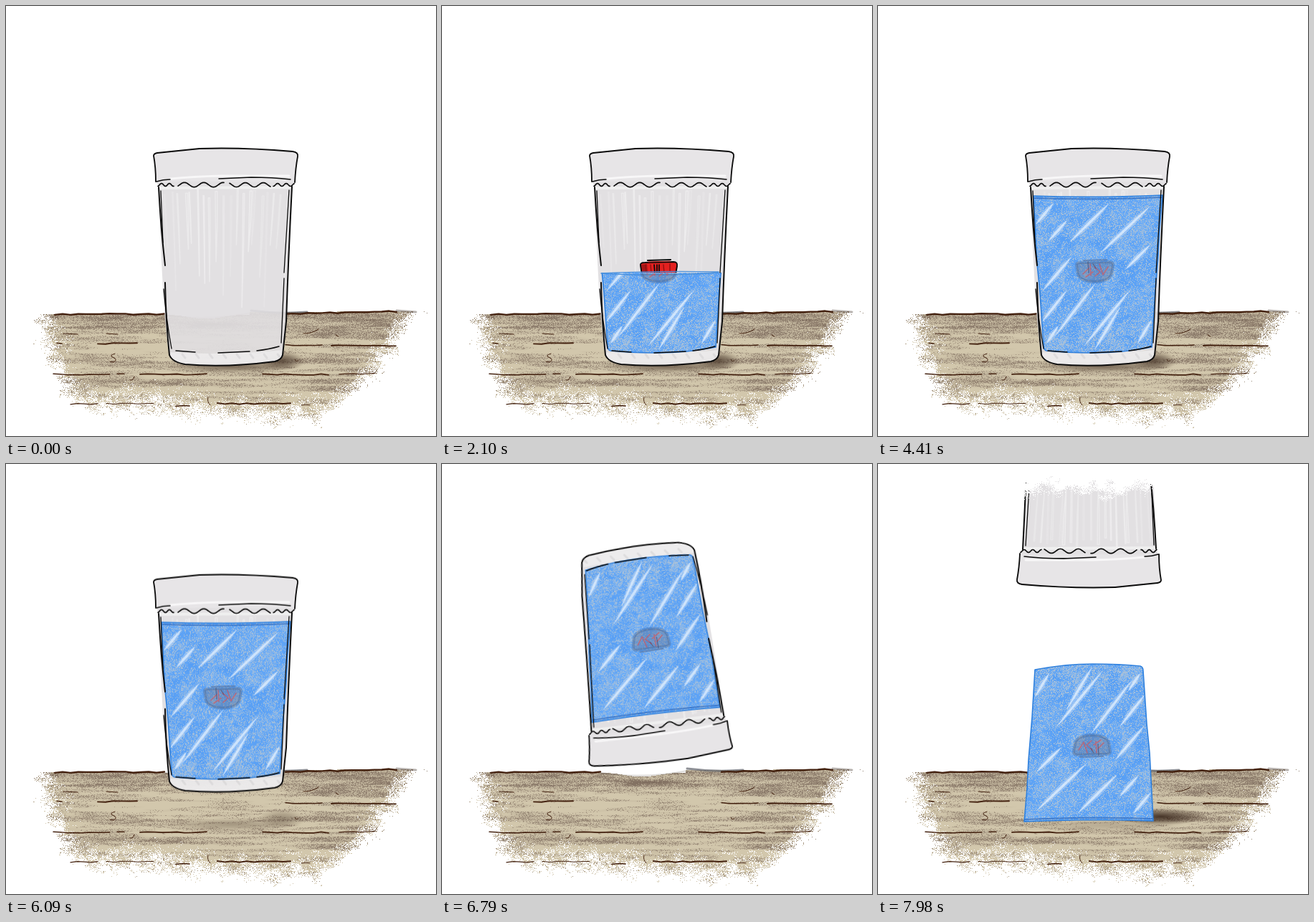
Animation, 600 px wide and 600 px high, one loop 8000 ms. Source, as an HTML page with a canvas:

```html
<!DOCTYPE html>
<html lang="en">
<head>
<meta charset="utf-8">
<title>Ice in a glass</title>
<style>
html, body { margin: 0; width: 100%; height: 100%; overflow: hidden; background: #fff; }
canvas { display: block; width: 600px; height: 600px; }
</style>
</head>
<body>
<canvas id="stage" width="600" height="600"></canvas>
<script>
const SIZE = 600, LOOP = 8000, STEP = 70;
const INK = '#0b0b0b', BARK = '#43210f', WAVE = '#84bffb', EDGE = '#2f80dd';
const ctx = document.getElementById('stage').getContext('2d');

const clamp = (v, a = 0, b = 1) => Math.min(b, Math.max(a, v));
const smooth = (a, b, v) => { const p = clamp((v - a) / (b - a)); return p * p * (3 - 2 * p); };
const bump = (v, mid, width) => Math.exp(-(((v - mid) / width) ** 2));
const mix = (a, b, p) => a + (b - a) * p;
const mixRgb = (a, b, p) => a.map((v, i) => mix(v, b[i], p));

function hash(x, y) {
  let h = Math.imul(x + 71, 374761393) ^ Math.imul(y + 29, 668265263);
  h = Math.imul(h ^ (h >>> 13), 1274126177);
  return ((h ^ (h >>> 16)) >>> 0) / 2 ** 32;
}

function noise(x, y) {
  const i = Math.floor(x), j = Math.floor(y);
  const u = smooth(0, 1, x - i), v = smooth(0, 1, y - j);
  return mix(mix(hash(i, j), hash(i + 1, j), u), mix(hash(i, j + 1), hash(i + 1, j + 1), u), v);
}

// Piecewise linear value through [key, value] points
function along(points, key) {
  for (let i = 1; i < points.length; i++) {
    const [a, va] = points[i - 1], [b, vb] = points[i];
    if (key <= b) return mix(va, vb, clamp((key - a) / (b - a)));
  }
  return points[points.length - 1][1];
}

function makeLayer(draw) {
  const c = document.createElement('canvas');
  c.width = c.height = SIZE;
  draw(c.getContext('2d'));
  return c;
}

// Grain layer: shade(x, y) gives [r, g, b, alpha] or nothing
function grain(top, bottom, shade) {
  return makeLayer(g => {
    const img = g.createImageData(SIZE, bottom - top);
    for (let y = top, n = 0; y < bottom; y++)
      for (let x = 0; x < SIZE; x++, n += 4) {
        const px = shade(x, y);
        if (px) img.data.set([px[0], px[1], px[2], px[3] * 255], n);
      }
    g.putImageData(img, 0, top);
  });
}

function stroke(g, d, color, width) {
  g.strokeStyle = color;
  g.lineWidth = width;
  g.lineCap = g.lineJoin = 'round';
  g.stroke(new Path2D(d));
}

function fill(g, d, color) {
  g.fillStyle = color;
  g.fill(new Path2D(d));
}

// ---------- table ----------
const leftEdge = [[424, 52], [450, 58], [490, 68], [520, 84], [545, 100], [575, 140]];
const rightEdge = [[424, 570], [450, 550], [480, 530], [510, 508], [540, 480], [575, 420]];

const boards = grain(420, 590, (x, y) => {
  const top = (x < 340 ? 430 : 426) + 6 * bump(x, 278, 32);
  if (y < top) return null;
  const foot = 556 + 12 * smooth(230, 300, x);
  const inside = Math.min(x - along(leftEdge, y), along(rightEdge, y) - x, foot - y);
  const rough = noise(x / 15, y / 10) * 0.6 + noise(x / 5, y / 4) * 0.4 - 0.5;
  if (hash(x, y) > smooth(-20, 28, inside + rough * 40)) return null;
  const band = 0.34 * smooth(474, 440, y) + 0.18 * bump(y, 494, 8) + 0.26 * bump(y, 526, 9)
    + 0.12 * smooth(400, 480, x);
  const streak = 0.6 * noise(x / 75, y / 3.5) + 0.4 * noise(x / 22, y / 2);
  const dark = clamp(band + 1.1 * (streak - 0.43) + 0.35 * bump(x, 280, 45) * bump(y, 445, 6));
  const speck = hash(x + 900, y) < dark ? 0.9 : 0;
  return [...mixRgb([210, 199, 172], [124, 106, 92], mix(dark, speck, 0.5)), 1];
});

function crack(g, x0, x1, y, width, rise = 0) {
  const n = Math.ceil((x1 - x0) / 11);
  let d = '';
  for (let i = 0; i <= n; i++)
    d += `${i ? 'L' : 'M'}${mix(x0, x1, i / n)} ${y + rise * i / n + (hash(x0 + i, y) - 0.5) * 2}`;
  stroke(g, d, BARK, width);
}

const table = makeLayer(g => {
  g.drawImage(boards, 0, 0);
  stroke(g, 'M222 431Q280 440 342 428', 'rgba(120,112,104,.25)', 2);
  stroke(g, 'M342 425Q380 430 420 427', 'rgba(95,98,106,.7)', 3);
  stroke(g, 'M545 425L572 427', 'rgba(95,85,78,.45)', 3);
  crack(g, 68, 221, 430, 2.4);
  crack(g, 390, 545, 430, 2.4, -4);
  for (const [a, b, y, w] of [
    [71, 78, 471, 1.6], [128, 183, 471, 1.9], [390, 441, 473, 1.4], [454, 544, 474, 1.8],
    [66, 145, 514, 1.5], [155, 165, 513, 1.4], [187, 280, 514, 1.8], [358, 450, 514, 1.8],
    [465, 515, 513, 1.2], [90, 128, 555, 1.2], [140, 206, 555, 1], [237, 256, 558, 1.6],
    [295, 397, 555, 2], [412, 424, 557, 1]
  ]) crack(g, a, b, y, w);
  stroke(g, 'M152 485Q143 488 149 490Q157 493 150 497L145 496M179 517Q178 523 173 522'
    + 'M403 493Q404 498 408 494M282 546Q280 552 285 557M80 457L100 458M140 457L156 458'
    + 'M415 457Q428 457 436 451M460 459L464 461', BARK, 1);
});

function shadow(x, y, rx, ry, alpha) {
  if (alpha <= 0) return;
  ctx.save();
  ctx.translate(x, y);
  ctx.scale(rx, ry);
  const g = ctx.createRadialGradient(0, 0, 0, 0, 0, 1);
  g.addColorStop(0, `rgba(62,44,32,${alpha})`);
  g.addColorStop(0.5, `rgba(70,52,40,${alpha * 0.65})`);
  g.addColorStop(1, 'rgba(80,60,45,0)');
  ctx.fillStyle = g;
  ctx.fillRect(-1, -1, 2, 2);
  ctx.restore();
}

// ---------- glass ----------
const RIM_TOP = 'M209 245Q209 225 206 209Q206 206 211 205Q240 202 270 199Q330 197 400 203Q408 204 407 210Q404 226 403 246';
const RIM = `${RIM_TOP}Z`;
const BODY = 'M210 244L403 244L399 254Q394 350 391 440L386 488Q384 494 375 496Q307 505 250 500Q232 497 228 488Q219 440 213 254Z';

const glassFill = makeLayer(g => {
  g.globalAlpha = 0.92;
  fill(g, BODY, '#e0dee0');
  fill(g, RIM, '#e5e3e5');
  g.globalAlpha = 1;
  g.save();
  g.clip(new Path2D(BODY));
  for (let i = 0; i < 20; i++) {
    const x = 219 + i * 9 + 5 * hash(i, 6), lean = (307 - x) * 0.07;
    const y0 = 254 + 14 * hash(i, 1), y1 = 330 + 95 * hash(i, 2), w = 1 + 2 * hash(i, 4);
    const d = `M${x} ${y0}L${x + w} ${y0}Q${x + w + lean / 2} ${(y0 + y1) / 2} ${x + lean} ${y1}Z`;
    stroke(g, d, `rgba(255,255,255,${0.1 + 0.3 * hash(i, 3)})`, 1.5);
  }
  fill(g, 'M225 483Q307 488 388 480L388 505L225 505Z', 'rgba(246,245,246,.6)');
  for (let x = 246; x < 380; x += 19)
    stroke(g, `M${x} 486L${x + 4} 491`, 'rgba(212,210,212,.6)', 3);
  stroke(g, 'M213 254L400 253', 'rgba(245,245,246,.7)', 4);
  g.restore();
  stroke(g, 'M230 241Q260 238 300 237L395 237', 'rgba(255,255,255,.7)', 3);
});

function scallop(x0, x1, period, crest, height) {
  let d = '';
  for (let x = x0; x <= x1; x++)
    d += `${d ? 'L' : 'M'}${x} ${249.5 - height * Math.cos((x - crest) / period * 2 * Math.PI)}`;
  return d;
}

const glassLines = makeLayer(g => {
  stroke(g, RIM_TOP, INK, 1.8);
  stroke(g, 'M210 245Q219 242 229 242M297 241L342 239Q372 239 397 242', INK, 1.5);
  stroke(g, scallop(212, 234, 11, 217, 2) + scallop(240, 304, 27, 249, 3.2)
    + scallop(312, 369, 25, 334, 3) + scallop(373, 402, 12, 379, 2), INK, 1.7);
  stroke(g, 'M213 253Q216 310 222 362M222 386Q223 440 228 487Q232 497 250 500Q307 505 375 496Q384 494 386 487'
    + 'L391 440Q394 350 399 252', INK, 2);
  stroke(g, 'M216 258L219 330M220 395Q224 440 231 478M395 257L388 372M388 380L384 470', INK, 1.3);
  stroke(g, 'M237 481L264 483M296 484L340 482M350 481Q367 479 381 475', INK, 1.5);
});

// ---------- water ----------
const wallL = y => 216 + (y - 254) * 0.066;
const wallR = y => 396 - (y - 254) * 0.058;

const waterGrain = (top, bottom, solid, rest) => grain(top, bottom, (x, y) => {
  const fade = mix(0.95, rest, smooth(solid, bottom - 4, y));
  const patch = noise(x / 5, y / 22);
  return [...mixRgb([190, 222, 252], [222, 235, 246], patch), clamp(fade + (hash(x, y) - 0.5) * 0.24)];
});
const lowWater = waterGrain(365, 486, 415, 0.04);
const highWater = waterGrain(255, 374, 325, 0.2);

function water(tex, level, floor, phase) {
  const l = wallL(level), r = wallR(level);
  let d = '';
  for (let x = l; x <= r; x += 2)
    d += `${d ? 'L' : 'M'}${x} ${level + Math.sin(x / 2.6 + phase * 1.7) * 0.9 + noise(x / 25, phase) * 2 - 1}`;
  ctx.save();
  ctx.clip(new Path2D(`${d}L${wallR(floor)} ${floor}L${wallL(floor)} ${floor}Z`));
  ctx.drawImage(tex, 0, 0);
  ctx.restore();
  stroke(ctx, d, WAVE, 1.6);
}

// ---------- ice ----------
const ICE = 'M217 265Q300 268 397 264L393 310L391 350L386 410L382 476Q340 484 301 484Q262 484 235 481Q231 480 231 474L226 400L222 360Z';
const GLINTS = [
  [220, 305, 245, 275], [238, 328, 264, 299], [267, 330, 323, 275], [309, 346, 380, 279],
  [230, 397, 270, 350], [345, 368, 380, 333], [228, 442, 264, 396], [246, 462, 304, 386],
  [288, 474, 352, 396], [302, 480, 338, 420], [362, 471, 382, 438], [235, 471, 252, 446]
];

const iceGrain = grain(255, 490, (x, y) => {
  const patch = 0.55 * noise(x / 17, y / 15) + 0.45 * noise(x / 6, y / 6);
  const pale = 0.04 + 0.52 * patch + 0.15 * smooth(435, 480, y);
  return hash(x, y) < pale ? [164, 191, 219, 1] : [...mixRgb([84, 156, 243], [112, 176, 249], patch), 1];
});

// Sliver pointed at both ends
function sliver(g, [x0, y0, x1, y1], width, color) {
  const mx = (x0 + x1) / 2, my = (y0 + y1) / 2;
  fill(g, `M${x0} ${y0}Q${mx - width} ${my - width} ${x1} ${y1}Q${mx + width} ${my + width} ${x0} ${y0}Z`, color);
}

const ice = makeLayer(g => {
  g.save();
  g.clip(new Path2D(ICE));
  g.drawImage(iceGrain, 0, 0);
  for (const line of GLINTS) {
    sliver(g, line, 6, 'rgba(205,226,250,.4)');
    sliver(g, line, 2.6, 'rgba(226,240,255,.75)');
  }
  stroke(g, 'M218 268Q300 271 396 267', 'rgba(45,105,190,.7)', 2);
  g.restore();
  stroke(g, ICE, EDGE, 1.6);
});

function icePart(y0, y1, alpha) {
  if (!alpha) return;
  ctx.globalAlpha = alpha;
  ctx.drawImage(ice, 0, y0, SIZE, y1 - y0, 0, y0, SIZE, y1 - y0);
  ctx.globalAlpha = 1;
}

// ---------- red cap ----------
const CAP = 'M277 362Q276 358 283 358L323 357Q329 357 328 363L326 374Q322 384 304 385Q284 385 279 375Z';

function cap(dy) {
  ctx.save();
  ctx.translate(0, dy);
  fill(ctx, CAP, '#e3201f');
  fill(ctx, 'M278 361L286 360L288 381Q280 378 278 361Z', '#a81616');
  stroke(ctx, 'M290 379L296 381M301 378L307 381M313 377L318 379', '#f0908a', 1.6);
  stroke(ctx, 'M284 361L285 374M291 361L292 372M309 361L310 372M318 360L318 370', '#8c0f10', 1.3);
  stroke(ctx, 'M296 361L297 373M300 361L300 375M303 361L303 374', INK, 1.7);
  stroke(ctx, CAP, INK, 1.9);
  stroke(ctx, 'M287 355L319 354', INK, 2.2);
  stroke(ctx, 'M288 357L318 356', '#c51c1c', 1.2);
  ctx.restore();
}

function frozenCap(y0, y1, alpha) {
  if (!alpha) return;
  ctx.save();
  ctx.beginPath();
  ctx.rect(260, y0, 90, y1 - y0);
  ctx.clip();
  ctx.globalAlpha = alpha;
  fill(ctx, CAP, 'rgba(96,112,146,.4)');
  stroke(ctx, CAP, 'rgba(70,90,128,.32)', 4);
  stroke(ctx, 'M287 355L319 354', 'rgba(70,90,128,.45)', 2);
  stroke(ctx, 'M286 374L294 366M296 360L297 376M302 364L310 371L303 377M309 360L314 375L321 364M290 378L300 371', 'rgba(216,84,88,.65)', 1.6);
  stroke(ctx, 'M293 357L294 372M300 360L304 366', 'rgba(70,62,92,.5)', 1.4);
  ctx.restore();
}

// Ragged white fade along the upper border
const topFade = grain(0, 56, (x, y) =>
  hash(x, y) < smooth(46, 22, y + (noise(x / 12, y / 8) - 0.5) * 24) ? [255, 255, 255, 1] : null);

// ---------- timeline ----------
function render(now) {
  const steps = (start, count) => clamp(Math.floor((now - start) / STEP) + 1, 0, count) / count;
  const rise1 = steps(140, 12), freeze1 = steps(1610, 8);
  const rise2 = steps(2520, 12), freeze2 = steps(3920, 8);
  const drop = steps(980, 5), ripple = steps(3360, 3);
  const k = steps(6090, 13) * 13;
  const slide = 62 * steps(7560, 3) ** 1.35;
  const lift = 330 * steps(7910, 2);
  const turn = smooth(3.17, 12, k);

  ctx.fillStyle = '#fff';
  ctx.fillRect(0, 0, SIZE, SIZE);
  ctx.drawImage(table, 0, 0);

  const upright = clamp(1 - k / 2), flipped = clamp((k - 11) / 2);
  shadow(385, 495, 34, 13, 0.75 * upright);
  shadow(315, 503, 95, 9, 0.6 * upright);
  shadow(395, 492, 66, 12, 0.95 * flipped);
  shadow(320, 504, 110, 9, 0.6 * flipped * (lift ? 0.3 : 1));

  ctx.save();
  ctx.translate(307 - 13 * turn - 50 * Math.sin(Math.PI * turn), 350.5 - 185 * Math.sin(Math.PI * k / 13));
  ctx.rotate(Math.PI * turn);
  ctx.translate(-307, -350.5);

  ctx.drawImage(glassFill, 0, lift);

  const phase = rise1 * 12 + drop * 5;
  if (rise1 && freeze1 < 1) {
    ctx.globalAlpha = 1 - freeze1 * 0.7;
    water(lowWater, 484 - 111 * rise1, 482, phase);
    ctx.globalAlpha = 1;
  }
  if (drop && freeze2 < 1) cap(-205 * (1 - ((drop * 5 - 1) / 4) ** 1.3));
  if (rise2 && freeze2 < 1) {
    ctx.globalAlpha = 1 - freeze2 * 0.7;
    water(highWater, 371 - 108 * rise2, 371, phase + rise2 * 12 + ripple * 3);
    ctx.globalAlpha = 1;
    if (!freeze2) cap(0);
  }

  ctx.save();
  ctx.translate(0, -slide);
  icePart(372, 490, freeze1);
  icePart(255, 372, freeze2);
  if (freeze1 && freeze2 < 1) {
    ctx.globalAlpha = freeze1 * (1 - freeze2);
    stroke(ctx, 'M222 373Q300 369 386 371M222 373Q300 378 386 372', '#4b91dd', 1.4);
    ctx.globalAlpha = 1;
  }
  frozenCap(373, 390, freeze1);
  frozenCap(350, 373, freeze2);
  ctx.restore();

  ctx.drawImage(glassLines, 0, lift);
  ctx.restore();
  if (k) ctx.drawImage(topFade, 0, 0);
}

let last = -1;
function tick() {
  const now = performance.now() % LOOP;
  const step = Math.floor(now / STEP);
  if (step !== last) {
    last = step;
    render(step * STEP);
  }
  requestAnimationFrame(tick);
}
tick();
</script>
</body>
</html>
```
